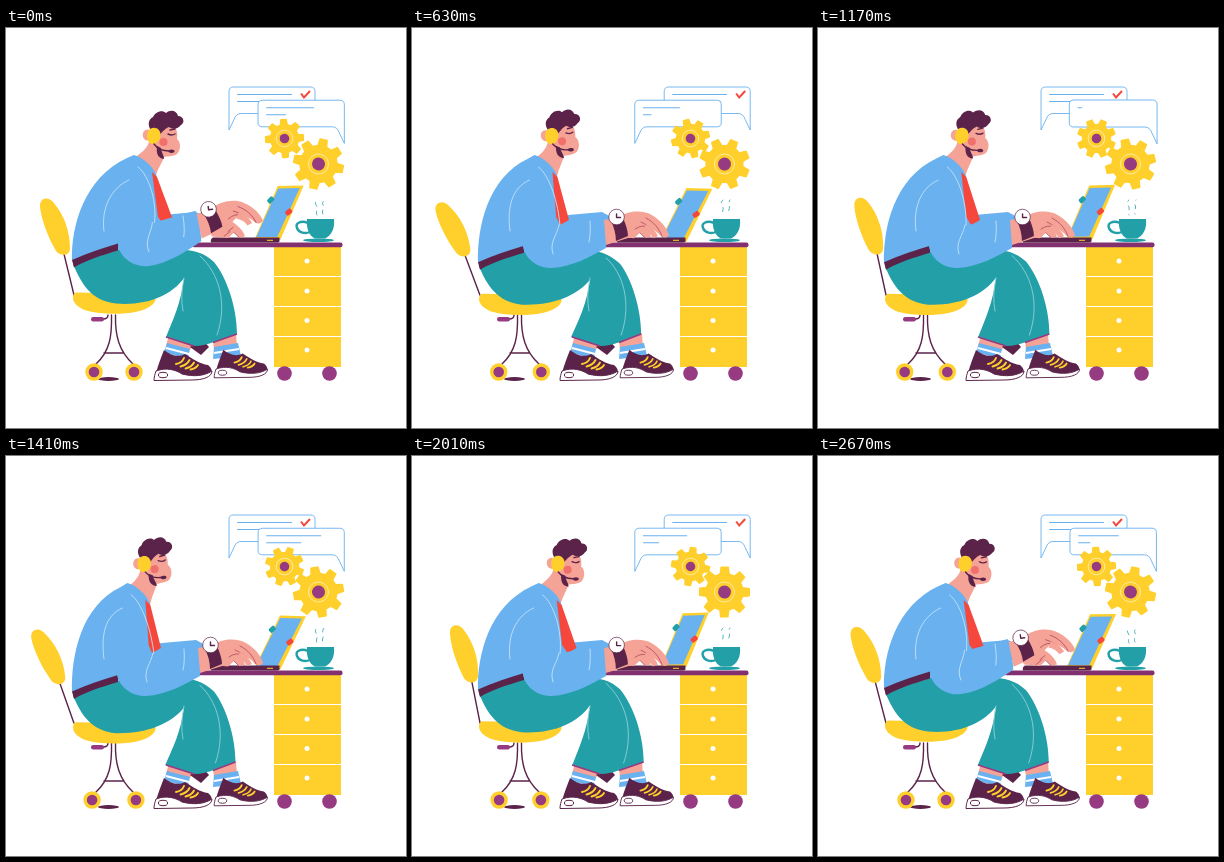
Recreate the animation shown at these times as an HTML page. Size 400x400 px, loop 2.7 s.

```html
<!DOCTYPE html>
<html lang="en">
<head>
<meta charset="utf-8">
<title>Help desk</title>
<style>
html, body { margin: 0; width: 100%; height: 100%; overflow: hidden; background: #fff; }
svg { display: block; width: 100%; height: 100%; }
.y { fill: #ffcf2b; } .d { fill: #5b2349; } .p { fill: #963b82; }
.b { fill: #69b1ef; } .t { fill: #239fa8; } .s { fill: #f5a396; }
.r { fill: #f5473c; } .w { fill: #fff; }
.ln { fill: none; stroke: #5b2349; stroke-width: 1.4; stroke-linecap: round; stroke-linejoin: round; }
.wl { fill: none; stroke: #c4e2f8; stroke-width: .9; stroke-linecap: round; }
.fl { fill: none; stroke: #b0485f; stroke-width: .8; stroke-linecap: round; }
.bl { fill: none; stroke: #69b1ef; stroke-width: 1; stroke-linecap: round; }
</style>
</head>
<body>
<svg viewBox="0 0 400 400" xmlns="http://www.w3.org/2000/svg">
  <defs>
    <g id="shoe">
      <path class="d" d="M158 322C164 327 172 330 179 326C187 331 194 336 202 337C206 340 207 344 204 346C190 350 170 348 150 345C152 337 155 330 158 322Z"/>
      <path class="w" d="M150 343C161 339 170 342 176 346C188 349 198 348 206 343C206 349 197 352 186 352L148 352.5C148 349 149 346 150 343Z" stroke="#5b2349"/>
      <ellipse class="w" cx="157" cy="347" rx="4.6" ry="2.7" stroke="#5b2349"/>
      <path d="M170 336Q176 335 178 330M174.500 338.500Q181 337 183.500 332M179.500 340.500Q186 339 188 334.500M184.500 341.500Q190 340.500 192 337" fill="none" stroke="#ffcf2b" stroke-width="1.900" stroke-linecap="round"/>
    </g>
  </defs>

  <g id="chat"></g>
  <g id="gears"></g>

  <!-- desk -->
  <path class="y" d="M268 218H335V339H268Z"/>
  <path d="M268 248.500H335M268 278.500H335M268 308.500H335" stroke="#fff" stroke-width="1.2"/>
  <g id="knobs"></g>
  <circle class="p" cx="278.500" cy="345.500" r="7.300"/>
  <circle class="p" cx="323.500" cy="345.500" r="7.300"/>
  <rect x="186" y="214.500" width="150.500" height="4.800" rx="2" fill="#82306f"/>

  <!-- cup -->
  <path class="t" d="M301 191H328C329 201 325 208 319 210.500H309C303 208 300 200 301 191Z"/>
  <path d="M302 195C295 192 289 195 291 200C293 205 299 206 304 204" fill="none" stroke="#239fa8" stroke-width="2.400"/>
  <ellipse class="t" cx="312.500" cy="212.300" rx="15.500" ry="1.800"/>
  <path id="steam" d="M311 187C309 184 313 181 310 177C309 175 309 174 311 172M317 186C315 183 319 180 317 177C316 175 317 174 318 172" fill="none" stroke="#239fa8" stroke-width=".8" stroke-dasharray="4 5" stroke-linecap="round"/>

  <!-- laptop -->
  <g id="lid">
    <path class="y" d="M271 158L297 157.500L273.500 212L248 211Z"/>
    <path class="b" d="M271.500 160.500L293 160L270.500 209L249.500 209Z"/>
    <rect class="t" x="260.500" y="169.500" width="7" height="5" rx="1.500" transform="rotate(-45 264 172)"/>
    <rect class="r" x="278.500" y="181.500" width="7" height="5" rx="1.500" transform="rotate(-40 282 184)"/>
  </g>
  <path class="d" d="M207 209.500H273.500V213.500Q273 214.500 271 214.500H205Q204 211 207 209.500Z"/>
  <path d="M261 212.300H267" stroke="#ffcf2b" stroke-width="1"/>

  <!-- chair -->
  <g id="back">
    <path class="ln" d="M58 226L68 267"/>
    <path class="y" d="M34 178C34 169 43 168 48 175C58 187 64 203 64 220C64 228 55 229 50 223C42 209 35 191 34 178Z"/>
  </g>
  <path class="ln" d="M97 291Q102 291 102 287M105.500 287C106 308 104 323 90 336M109.500 287C109 308 113 323 127 336M98 325H117"/>
  <path id="seat" class="y" d="M70 264.500C65 267 65 277 80 282.500C100 288 135 287 146 277C150 273 151 270 147 266Z"/>
  <rect class="p" x="85" y="289" width="13" height="4.500" rx="2.200"/>
  <ellipse class="d" cx="102.500" cy="351" rx="10.500" ry="1.900"/>
  <g id="wheelL"><circle class="y" r="8.700"/><circle class="p" r="5.300"/></g>
  <g id="wheelR"><circle class="y" r="8.700"/><circle class="p" r="5.300"/></g>

  <!-- legs -->
  <path class="s" d="M163 307L187 315L184 322L160 318Z"/>
  <path class="s" d="M207 312L230 305L231 320L208 322Z"/>
  <path class="b" d="M161 315L184 321L182 330L158 325Z"/>
  <path class="b" d="M208 319L232 315L235 328L207 331Z"/>
  <path d="M160 320L183 326M208 325L233 321" stroke="#fff" stroke-width="2"/>
  <path class="d" d="M184 319L196 311L203 319L195 327Z"/>
  <use href="#shoe"/>
  <use href="#shoe" transform="translate(72 25.500) scale(.92)"/>
  <path class="t" id="legs"/>
  <path id="hem" fill="none" stroke="#963b82" stroke-width="1.800"/>
  <path class="wl" id="seam" style="stroke:#8fd0d6"/>

  <!-- far arm -->
  <path class="b" d="M145 188L190 184L201 190V203L150 205Z"/>
  <g id="farHand">
    <path class="s" d="M198 191C210 187 222 191 230 197C235 201 238 205 239 209L233 210L228 205L222 210.500L206 209Z"/>
    <path class="fl" d="M222 204L227 200M228 205L233 210M218 209L224 204"/>
  </g>

  <!-- head -->
  <g id="head">
    <path class="s" d="M146 102L166 97C171 100 172 105 171 111C175 114 175 122 171 126C167 129 160 128 158 129C156 135 152 140 149 150L124 133C135 125 141 121 143 114Z"/>
    <ellipse class="s" cx="141.500" cy="107" rx="4.800" ry="5.500"/>
    <path class="d" d="M151 118C150 126 152 130 158 131C158 127 155 124 155 120Z"/>
    <circle cx="157.500" cy="114" r="4" fill="#f0706c"/>
    <path class="d" d="M146 104C142 99 141 92 147 89C149 84 156 81 160 85C165 81 171 83 172 88C178 88 179 95 175 97C172 101 167 102 163 99C158 101 156 105 153 107Z"/>
    <path class="ln" d="M162 106Q166 108 169 106M164 102L169 101" stroke-width="1"/>
    <path class="y" d="M144 101C149 98 154.500 101 154.500 107C154.500 113 150 117 144.500 115.500C140 113 140 103.500 144 101Z"/>
    <path class="ln" d="M148 116Q153 123 163 123" stroke-width="1.100"/>
    <ellipse class="d" cx="165.500" cy="123.300" rx="3" ry="1.700"/>
  </g>

  <!-- torso -->
  <path class="b" id="shirt"/>
  <path class="r" id="tie"/>
  <path class="d" id="belt" d="M66 232C82 225 97 220 112 215.500V222.500C96 227.500 80 232 68 239.500Z"/>
  <path class="wl" id="fold"/>

  <!-- near arm -->
  <g id="arm">
    <path class="b" d="M112 205C120 198 140 201 155 196L191 189C193 199 195 210 194 220C180 228 160 239 140 240C122 241 109 225 111 214Z"/>
    <path class="wl" d="M147 197C145 208 137 214 141 226M178 193Q179 206 177 214"/>
    <g id="hand">
      <path class="s" d="M192 192L208 189C216 182 232 182 240 187C250 193 255 200 257 207C255 210 252 210 249 208C245 203 240 200 234 199C228 203 222 209 216 210L194 217Z"/>
      <path class="fl" d="M234 190C242 194 247 200 250 208M229 194C236 197 241 201 243 207M223 201Q230 196 236 199"/>
      <path class="s" d="M234 196C240 199 244 203 246 208L241 210C239 206 235 203 231 202Z"/>
      <path class="d" d="M199 193L211 190C214 197 216 203 216 208L204 213C204 206 202 199 199 193Z"/>
      <circle class="w" cx="204.500" cy="189" r="7.800" stroke="#5b2349" stroke-width=".7"/>
      <path class="ln" d="M204.500 186V189.500H208.500" stroke-width=".9"/>
    </g>
  </g>
</svg>
<script>
const LOOP = 2700, BEAT = 900, POP = 675, POP_START = 210, STEP = 30;
const $ = id => document.getElementById(id);
const set = (id, name, value) => $(id).setAttribute(name, value);
const move = (id, value) => set(id, 'transform', value);
const clamp = x => Math.max(0, Math.min(1, x));
const ease = x => (1 - Math.cos(Math.PI * clamp(x))) / 2;
const wave = x => Math.cos(2 * Math.PI * x);

$('knobs').innerHTML = [233, 263, 292.5, 322]
  .map(y => `<circle class="w" cx="301" cy="${y}" r="2.500"/>`).join('');

function gearPath(outer, root, teeth) {
  const pts = [];
  for (let i = 0; i < teeth; i++) {
    [[-.31, root], [-.18, outer], [.18, outer], [.31, root]].forEach(([f, r]) => {
      const a = (i + f) / teeth * 2 * Math.PI;
      pts.push(`${(r * Math.sin(a)).toFixed(2)} ${(-r * Math.cos(a)).toFixed(2)}`);
    });
  }
  return `M${pts.join('L')}Z`;
}

const gear = (id, outer, root, hub) => `<g id="${id}">
  <path class="y" d="${gearPath(outer, root, 8)}" stroke="#ffcf2b" stroke-width="1.500" stroke-linejoin="round"/>
  <circle r="${hub + 3.5}" fill="none" stroke="#fff0b8" stroke-width=".8"/>
  <circle class="p" r="${hub}"/></g>`;
$('gears').innerHTML = gear('small', 19, 14, 4.8) + gear('large', 25, 18.5, 6.5);

const BOX = 'M-43 21.500V-17Q-43 -21.500 -38.500 -21.500H38.500Q43 -21.500 43 -17V1Q43 5 38.500 5H-31Q-36 5 -38 11Z';

function bubble(side, age) {
  let x = side < 0 ? 266 : 295.2, y = 93.8, s = 1;
  if (age < 90) {
    const p = Math.sin(age / 90 * Math.PI / 2);
    s = 1.13 * p;
    y += 6 + 14 * (1 - p);
  } else if (age < POP) {
    s = 1 + .13 * Math.exp((90 - age) / 105);
    y += 6 * Math.exp((90 - age) / 50);
  } else {
    y -= 13.3 * ease((age - POP) / 130);
  }
  if (age > 2 * POP) {
    const q = (age - 2 * POP) / 180;
    if (q >= 1) return '';
    y -= 18.6 * ease(q * 180 / 130);
    s = 1 - q * q;
  }
  const line = (top, from, span, len) => {
    const p = clamp((age - from) / span);
    return p ? `<path class="bl" d="M-34.500 ${top}h${len * p}"/>` : '';
  };
  const c = ease((age - 530) / 80);
  return `<g transform="translate(${x} ${y}) scale(${s})">
    <path d="${BOX}" transform="scale(${-side} 1)" fill="#fff" stroke="#69b1ef" stroke-width=".9"/>
    ${line(-14, 270, 225, 54)}${line(-7, 390, 190, 48)}
    <path d="M-4 -1L-1 3L5 -3.500" transform="translate(33 -14) scale(${c})" fill="none" stroke="#f5473c" stroke-width="2"/>
  </g>`;
}

function draw(t) {
  const ph = t / BEAT;
  const c = wave(ph - .18);                        // chair and lid sway
  const u = 3.5 * (wave(ph - .07) - wave(.07));    // upper body lean
  const v = 1.8 * (1 - wave(ph));                  // hips sinking
  const raise = Math.max(0, wave(ph)) ** 3;        // hand lift

  // chat
  const k = Math.floor((t - POP_START) / POP);
  const age = t - POP_START - k * POP;
  $('chat').innerHTML = [2, 1, 0]
    .map(n => bubble((k - n) % 2 ? 1 : -1, age + n * POP)).join('');

  // objects
  const turn = 45 * t / LOOP;
  move('small', `translate(278.500 110.500) rotate(${-3 - turn})`);
  move('large', `translate(312.500 136) rotate(${12 + turn})`);
  set('steam', 'stroke-dashoffset', -18 * ph);
  move('lid', `translate(.7 ${.9 * (.43 - c)}) rotate(${-2 * (c - .43)} 260 212)`);
  move('back', `rotate(${4.8 * (c - .43)} 68 268)`);
  move('seat', `translate(0 ${v * .5})`);
  const roll = wave(ph);
  move('wheelL', `translate(${87 + roll} 344)`);
  move('wheelR', `translate(${129 - roll} 344)`);

  // body
  const g = 1.3 * (c - .43);
  set('legs', 'd', `M67 ${236 + v}C75 ${255 + v} 85 ${273 + v / 2} 110 ${275.5 + v / 2}C140 278 165 268 178 ${250 - g}C175 275 167 292 ${160 + g / 2} 309L188 318C196 318 202 316 208 314L${231 + g} 306C${231 + g} 280 ${221 + g} 250 208 ${234 - g}C196 ${222 - g} 180 221 165 222H112Z`);
  set('hem', 'd', `M160 309L188 318M207 314.500L${231 + g} 306`);
  set('seam', 'd', `M194 ${228 - g}C${213 + g} 245 ${222 + g} 275 ${211 + g} 307M178 250Q174 268 177 283`);
  move('belt', `translate(0 ${v})`);
  move('head', `translate(${u} 0) rotate(${.9 * u} 148 135)`);
  set('shirt', 'd', `M66 ${233 + v}C65 198 ${78 + u / 3} 150 ${121 + u} ${130 - u / 5}L${128 + u} 127C${138 + u} 130 ${146 + u} 138 ${150 + u} 146L${163 + 1.8 * u} 192L150 215L112 ${222 + v}V${216 + v}C97 ${221 + v} 82 ${225 + v} 66 ${233 + v}Z`);
  set('tie', 'd', `M${146 + u} 144L${151 + u} 149L${167 + 1.8 * u} 192L${158 + 1.8 * u} 197L${152 + 1.4 * u} 189Z`);
  set('fold', 'd', `M98 203C95 180 ${105 + u} 160 ${123 + u} 152M${132 + u} 139C${143 + u} 147 ${152 + u} 175 148 198`);

  // arms
  const tap = wave(ph * 4);
  move('arm', `translate(${1.5 * raise} ${-raise}) rotate(${-5 * raise} 128 220)`);
  move('hand', `rotate(${-3 * raise + .7 * tap} 200 200)`);
  move('farHand', `translate(0 ${-.6 * tap})`);
}

function tick(now) {
  draw(Math.floor(now % LOOP / STEP) * STEP);
  requestAnimationFrame(tick);
}
draw(0);
requestAnimationFrame(tick);
</script>
</body>
</html>
```
